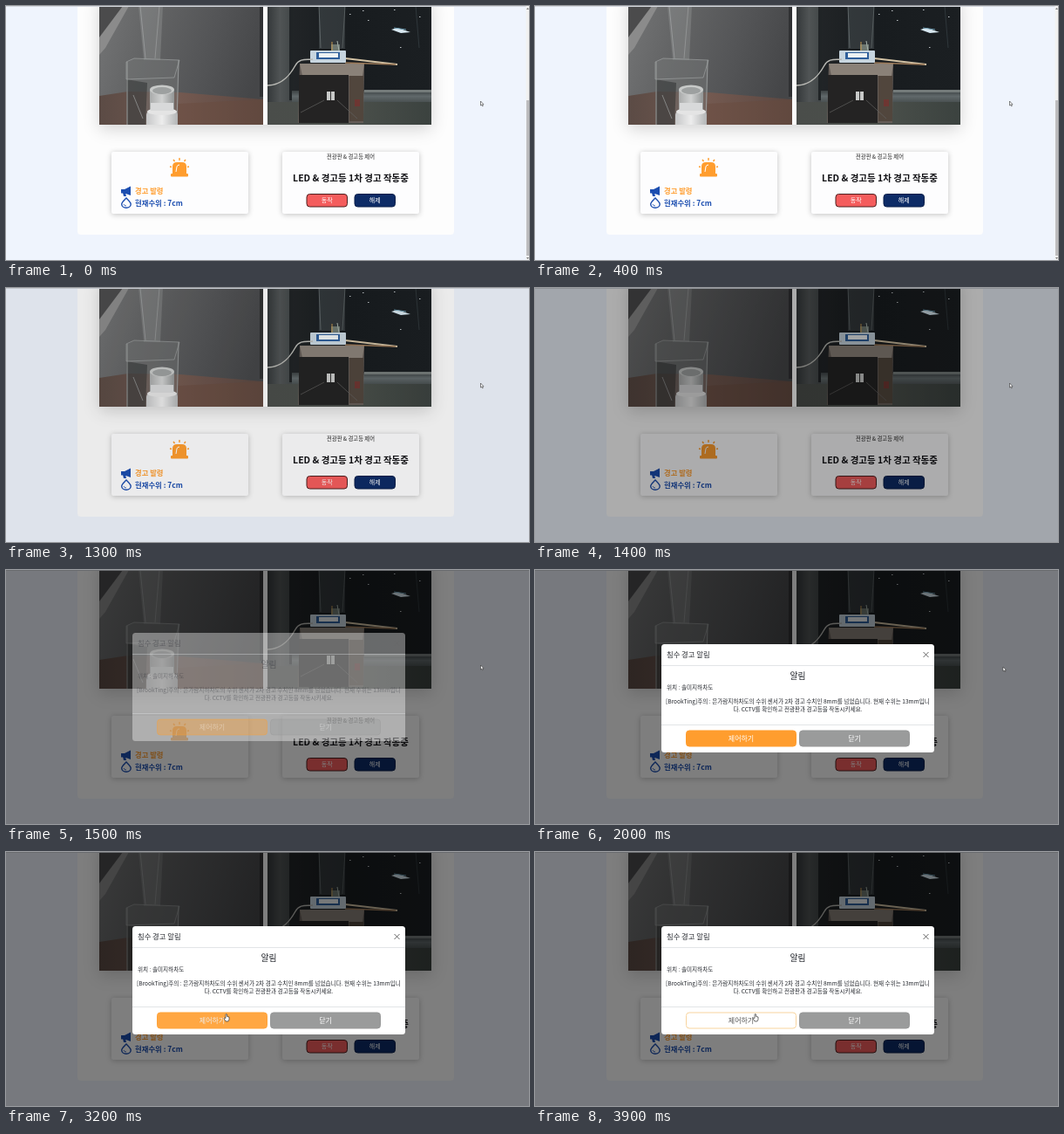
An HTML page with a canvas that plays this animation: 600 px wide and 291 px high, repeating every 4000 ms.

```html
<!DOCTYPE html>
<html lang="ko">
<head>
<meta charset="utf-8">
<title>침수 경고</title>
<style>
html, body { margin: 0; width: 100%; height: 100%; overflow: hidden; background: #eff4fd; }
canvas { display: block; width: 600px; height: 291px; }
</style>
</head>
<body>
<canvas id="stage" width="600" height="291"></canvas>
<script>
const ctx = document.getElementById('stage').getContext('2d');
const LOOP = 4000, STEP = 100;
const FAMILY = '"Noto Sans CJK KR", "Noto Sans KR", "Noto Sans", sans-serif';
const ORANGE = '#ff9d2e', BLUE = '#1c4eb0';

function rect(x, y, w, h, fill) {
  ctx.fillStyle = fill;
  ctx.fillRect(x, y, w, h);
}

function box(x, y, w, h, r, fill, stroke, lineWidth = 1) {
  ctx.beginPath();
  ctx.roundRect(x, y, w, h, r);
  if (fill) { ctx.fillStyle = fill; ctx.fill(); }
  if (stroke) { ctx.strokeStyle = stroke; ctx.lineWidth = lineWidth; ctx.stroke(); }
}

function poly(points, fill, stroke, lineWidth = 1) {
  ctx.beginPath();
  for (let i = 0; i < points.length; i += 2) ctx.lineTo(points[i], points[i + 1]);
  ctx.closePath();
  if (fill) { ctx.fillStyle = fill; ctx.fill(); }
  if (stroke) { ctx.strokeStyle = stroke; ctx.lineWidth = lineWidth; ctx.stroke(); }
}

function line(x1, y1, x2, y2, color, width = 1) {
  ctx.beginPath();
  ctx.moveTo(x1, y1);
  ctx.lineTo(x2, y2);
  ctx.strokeStyle = color;
  ctx.lineWidth = width;
  ctx.stroke();
}

function path(d, fill, stroke, lineWidth = 1) {
  const p = new Path2D(d);
  if (fill) { ctx.fillStyle = fill; ctx.fill(p); }
  if (stroke) { ctx.strokeStyle = stroke; ctx.lineWidth = lineWidth; ctx.stroke(p); }
}

function ellipse(x, y, rx, ry, fill) {
  ctx.beginPath();
  ctx.ellipse(x, y, rx, ry, 0, 0, Math.PI * 2);
  ctx.fillStyle = fill;
  ctx.fill();
}

function text(str, x, y, size, color, weight = 400, align = 'left') {
  ctx.font = `${weight} ${size}px ${FAMILY}`;
  ctx.textAlign = align;
  ctx.textBaseline = 'alphabetic';
  ctx.fillStyle = color;
  ctx.fillText(str, x, y + size * 0.36);
}

function gradient(x1, y1, x2, y2, ...colors) {
  const g = ctx.createLinearGradient(x1, y1, x2, y2);
  colors.forEach((c, i) => g.addColorStop(i / (colors.length - 1), c));
  return g;
}

function shadowed(blur, dy, color, draw) {
  ctx.save();
  ctx.shadowBlur = blur;
  ctx.shadowOffsetY = dy;
  ctx.shadowColor = color;
  draw();
  ctx.restore();
}

function clipped(x, y, w, h, draw) {
  ctx.save();
  ctx.beginPath();
  ctx.rect(x, y, w, h);
  ctx.clip();
  draw();
  ctx.restore();
}

function tankCamera() {
  rect(107, 0, 188, 136, gradient(107, 0, 295, 60, '#747576', '#626364', '#545557', '#454648'));
  poly([107, 0, 141, 0, 114, 48, 107, 56], '#8b8b8b');
  poly([107, 0, 134, 0, 107, 36], '#4b4b4c');
  poly([107, 103, 140, 98, 200, 99, 295, 107, 295, 136, 107, 136], gradient(107, 0, 295, 0, '#5b4b45', '#735950', '#5a4741'));
  poly([197, 112, 295, 107, 295, 136, 197, 136], 'rgba(105,74,60,.45)');
  rect(291, 0, 4, 104, '#303133');
  // water stream and glass tank
  poly([152, 0, 180, 0, 177, 62, 158, 62], 'rgba(150,152,154,.38)');
  line(154, 0, 160, 60, 'rgba(185,187,188,.45)');
  line(176, 0, 171, 60, 'rgba(185,187,188,.4)');
  poly([138, 64, 147, 60, 199, 62, 197, 136, 139, 136], 'rgba(120,124,124,.4)');
  poly([138, 84, 162, 88, 160, 136, 139, 136], 'rgba(38,40,40,.48)');
  poly([138, 64, 147, 60, 199, 62, 193, 82, 138, 84], null, 'rgba(165,168,168,.6)');
  line(139, 64, 139, 136, '#9a9d9c');
  line(198, 62, 196, 132, 'rgba(165,168,168,.75)');
  line(146, 102, 157, 129, 'rgba(190,195,195,.5)');
  // cup
  rect(165, 96, 28, 25, gradient(165, 0, 193, 0, '#a9abab', '#d1d2d2', '#929595'));
  ellipse(179, 96, 14, 5.5, '#c7c9c8');
  ellipse(179, 97, 11, 4, '#9da0a0');
  box(161, 120, 36, 20, 5, gradient(161, 0, 197, 0, '#c6c7c8', '#ededed', '#b3b5b6'));
  ellipse(179, 121, 17, 4, '#e4e4e4');
  rect(166, 111, 26, 9, '#d8d9da');
}

function windowCamera() {
  rect(300, 0, 188, 136, gradient(300, 0, 488, 0, '#25282a', '#181c1f', '#1b1f22'));
  rect(300, 0, 29, 136, gradient(300, 0, 329, 0, '#34383a', '#505455', '#414647'));
  rect(325, 0, 4, 108, '#202426');
  rect(328, 97, 160, 13, gradient(0, 97, 0, 110, '#3c4243', '#60686a', '#4a5152'));
  rect(300, 110, 188, 26, gradient(300, 0, 488, 0, '#4a4d4a', '#4b504b', '#3b423f'));
  rect(411, 96, 77, 3, '#747b7a');
  // city lights
  for (const [x, y] of [[394, 9], [409, 5], [415, 16], [445, 4], [474, 12], [452, 47]]) {
    rect(x, y, 1.5, 1, '#bfc4c7');
  }
  poly([442, 27, 449, 25, 464, 30, 453, 31], '#d7e7f0');
  line(445, 25, 459, 27, '#6f9db2');
  line(470, 0, 474, 48, '#2f373b');
  // clear tower behind the circuit board
  rect(359, 0, 30, 49, 'rgba(95,103,107,.34)');
  line(359, 0, 361, 48, 'rgba(130,137,138,.55)');
  line(389, 0, 386, 48, 'rgba(130,137,138,.45)');
  // stand
  poly([337, 66, 411, 66, 410, 134, 335, 134], '#645c57');
  poly([337, 66, 411, 66, 409, 80, 340, 80], '#8a8178');
  rect(336, 79, 57, 55, '#242323');
  rect(394, 80, 16, 52, '#51463d');
  line(338, 122, 365, 108, '#626261', .7);
  line(380, 108, 403, 129, '#626261', .7);
  rect(368, 98, 9, 10, '#c8c9c8');
  line(372.5, 98, 372.5, 108, '#303030');
  rect(400, 107, 6, 8, '#6e3632');
  // board, display and sticks
  line(389, 60, 449, 67, '#d4c3a5', 2);
  line(389, 65, 447, 67, '#9b7958', 1.5);
  box(349, 51, 41, 14, 1, '#c7d5df');
  rect(356, 53, 27, 8, '#2f5f9b');
  rect(359, 54, 22, 5, '#edf2f3');
  rect(373, 44, 10, 7, '#6e7871');
  line(374, 41, 374, 51, '#c69a50');
  line(380, 40, 382, 51, '#a8b4ad');
  path('M300 91 C318 91 327 77 332 68 S345 62 352 61', null, '#b9b9b4', 1.5);
}

function siren() {
  path('M191 193 V184 Q191 179 196 179 H202 Q207 179 207 184 V193 Z', ORANGE);
  box(189, 192, 20, 3.5, 1, ORANGE);
  path('M195 190 L196 184 Q196.5 182 199 182', null, '#fff', 1);
  for (const [x1, y1, x2, y2] of [[199, 174, 199, 177], [192, 176, 193.5, 178], [206, 176, 204.5, 178],
    [188, 184, 190, 184.5], [210, 184, 208, 184.5]]) line(x1, y1, x2, y2, ORANGE, 1.4);
}

function button(x, y, w, h, label, fill, border, color, size) {
  box(x, y, w, h, 3.5, fill, border);
  text(label, x + w / 2, y + h / 2, size, color, 400, 'center');
}

function page() {
  rect(0, 0, 600, 291, '#eff4fd');
  box(82, -6, 432, 268, 4, '#fdfdfd');
  shadowed(18, 5, 'rgba(0,0,0,.17)', () => box(107, -10, 381, 146, 0, '#fdfdfd'));
  clipped(107, 0, 188, 136, tankCamera);
  clipped(300, 0, 188, 136, windowCamera);

  for (const x of [121, 317]) {
    shadowed(6, 1, 'rgba(0,0,0,.24)', () => box(x, 167, 157, 71, 2, '#fdfdfe'));
  }
  siren();
  path('M132 210 H136 L143 206.5 V217 L136 214.5 H132 Z M134 214 H137 L138 218 H135 Z', BLUE);
  path('M138 220 C135 223 132.7 224.8 132.7 227 A5.2 4.2 0 0 0 143.2 227 C143.2 224.8 141 223 138 220 Z', null, BLUE, 1.4);
  path('M135 227 Q135.5 229 138 229', null, BLUE, .8);
  text('경고 발령', 148, 212, 8.3, ORANGE, 700);
  text('현재수위 : 7cm', 148, 225.7, 8.4, BLUE, 700);

  text('전광판 & 경고등 제어', 395.5, 173, 6.3, '#222', 400, 'center');
  text('LED & 경고등 1차 경고 작동중', 395.5, 197, 10.5, '#101014', 700, 'center');
  button(345, 215.5, 46.5, 14.5, '동작', '#f45c5c', '#4d2020', '#fff', 7);
  button(400, 215.5, 46.5, 14.5, '해제', '#0d2b66', '#0a1f4a', '#fff', 7);
  rect(0, 0, 600, 1, '#d3d7de');
}

function scrollbar() {
  rect(596.5, 0, 3.5, 291, '#f1f1f1');
  rect(597, 108, 3, 178, '#bcbcbe');
  poly([597, 4, 600, 4, 598.5, 2], '#777');
  poly([597, 288, 600, 288, 598.5, 290], '#777');
}

const mix = (a, b, k) => a.map((v, i) => Math.round(v + (b[i] - v) * k));
const rgb = c => `rgb(${c.join()})`;

function modal(hover) {
  const ink = '#23262c';
  box(145, 85, 313, 124, 3.5, '#fff');
  text('침수 경고 알림', 151, 97, 8.3, ink);
  line(445.5, 94, 451.5, 100, '#666', 1);
  line(451.5, 94, 445.5, 100, '#666', 1);
  rect(145, 109, 313, 1, '#e2e4e7');
  text('알림', 301.5, 121.3, 9.8, ink, 400, 'center');
  text('위치 : 솔미지하차도', 151, 134.5, 6.6, ink);
  text('[BrookTing]주의 : 은가람지하차도의 수위 센서가 2차 경고 수치인 8mm를 넘었습니다. 현재 수위는 13mm입니',
    301.5, 150.5, 6.6, ink, 400, 'center');
  text('다. CCTV를 확인하고 전광판과 경고등을 작동시키세요.', 301.5, 160, 6.6, ink, 400, 'center');
  rect(145, 177, 313, 1, '#e2e4e7');
  const fill = rgb(mix([255, 157, 46], [255, 255, 255], hover));
  const label = rgb(mix([255, 255, 255], [85, 85, 85], hover));
  button(173.5, 184, 126, 18, '제어하기', fill, rgb(mix([255, 157, 46], [248, 212, 158], hover)), label, 8);
  button(303.5, 184, 126, 18, '닫기', '#9a9b9b', '#969797', '#fff', 8);
}

// Piecewise-linear track of [time, ...values] keys.
function track(keys, t) {
  let i = 1;
  while (i < keys.length - 1 && keys[i][0] < t) i++;
  const [t0, ...a] = keys[i - 1], [t1, ...b] = keys[i];
  const k = Math.min(1, Math.max(0, (t - t0) / (t1 - t0)));
  return a.map((v, j) => v + (b[j] - v) * k);
}

const DIM = [[1200, 0], [1300, .07], [1400, .32], [1500, .5]];
const MODAL = [[1400, 0, -15], [1500, .38, -13], [1600, .82, -6], [1700, 1, -2], [1800, 1, 0]];
const POINTER = [[1800, 544.5, 109], [2000, 537, 111], [2200, 523, 116], [2400, 497, 123],
  [2600, 430, 143], [2800, 335, 171], [3000, 264, 186], [3100, 252, 186]];
const HOVER = [[3100, 0], [3200, .1], [3300, .75], [3400, 1]];

function pointer(t) {
  const [x, y] = track(POINTER, t);
  ctx.save();
  ctx.translate(x, y);
  if (t >= 3000) {
    path('M0 0 Q1 -1 1.6 0 V2.5 L4 3 V6 L3 8 H0 L-2 4.5 Q-1.4 3.4 0 4.5 Z', '#fff', '#333', .7);
  } else {
    path('M0 0 V5 L1.2 4 L2 5.8 L2.8 5.4 L2.1 3.7 H3.5 Z', '#fff', '#333', .6);
  }
  ctx.restore();
}

function render(t) {
  page();
  const [dim] = track(DIM, t);
  if (dim) rect(0, 0, 600, 291, `rgba(0,0,0,${dim})`);
  else scrollbar();
  const [alpha, dy] = track(MODAL, t);
  if (alpha) {
    // Fade the dialog as one translucent layer.
    ctx.save();
    ctx.translate(0, dy);
    ctx.globalAlpha = alpha;
    modal(track(HOVER, t)[0]);
    ctx.restore();
  }
  pointer(t);
}

function tick() {
  const t = performance.now() % LOOP;
  render(Math.floor(t / STEP) * STEP);
  requestAnimationFrame(tick);
}
tick();
</script>
</body>
</html>
```
